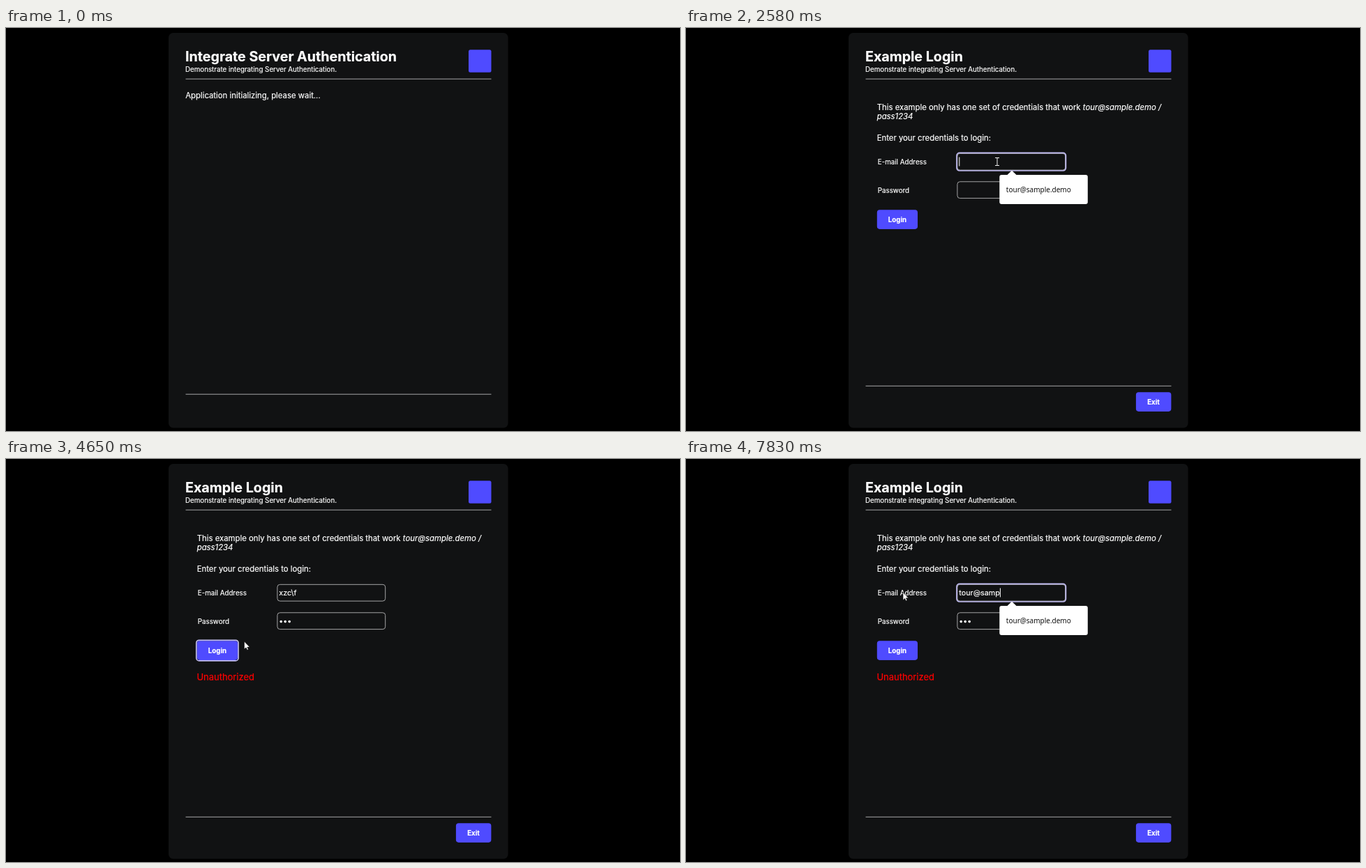
Write an HTML page that moves like this. It is 966 px wide and 579 px high and loops after 8 s.

```html
<!DOCTYPE html>
<html lang="en">
<head>
<meta charset="utf-8">
<title>Example Login</title>
<style>
  html, body { margin: 0; width: 100%; height: 100%; overflow: hidden; background: #000; }
  svg { display: block; }
  text { font: 11.35px Inter, sans-serif; color: #fff; fill: currentColor; stroke: currentColor; stroke-width: .2; white-space: pre; }
  .title { font-size: 19.66px; font-weight: 700; }
  .small { font-size: 9.77px; }
  .bold { font-size: 9.73px; font-weight: 700; }
  .italic { font-style: italic; }
  .typed { font-size: 10.8px; }
  .error { font-size: 12.98px; color: #f00; }
  .hint { font: 10px "Noto Sans", "Open Sans", sans-serif; color: #111; stroke: none; }
  .button { fill: #4f4bff; }
  .hover { fill: #1c17ff; }
  .field { fill: none; stroke: #a4a4a5; }
  .ring { fill: none; stroke: #c2bdf3; stroke-width: 1.7; }
  .rule { stroke: #a6a6a7; }
</style>
</head>
<body>
<svg width="966" height="579" viewBox="0 0 966 579">
  <rect x="233" y="7" width="486.6" height="567.5" rx="6.5" fill="#111213"/>
  <text id="title" class="title" x="257" y="48.2"></text>
  <text class="small" x="257" y="63.3">Demonstrate integrating Server Authentication.</text>
  <rect x="663" y="31.3" width="32.5" height="32.5" rx="2.5" fill="#4f4bff"/>
  <path class="rule" d="M257.5 73.2H695.5"/>
  <path id="footer" class="rule" d="M257.5 0H695.5"/>
  <text id="wait" x="257.2" y="101.3">Application initializing, please wait...</text>

  <g id="form">
    <text x="273.7" y="117.5">This example only has one set of credentials that work <tspan class="italic">tour@sample.demo /</tspan></text>
    <text class="italic" x="273.7" y="131.4">pass1234</text>
    <text x="273.7" y="161.5">Enter your credentials to login:</text>
    <text class="small" x="274.8" y="195.7">E-mail Address</text>
    <text class="small" x="274.8" y="236.5">Password</text>
    <rect class="field" x="388.9" y="180.3" width="154.8" height="23.8" rx="3.8"/>
    <rect class="field" x="388.9" y="220.8" width="154.8" height="23.8" rx="3.8"/>
    <rect id="login" class="button" x="273.8" y="261.3" width="58.2" height="27.6" rx="3.8"/>
    <text class="bold" x="303" y="278.7" text-anchor="middle">Login</text>
    <rect class="button" x="644.9" y="523.3" width="50.5" height="27.6" rx="3.8"/>
    <text class="bold" x="670" y="540.8" text-anchor="middle">Exit</text>
    <text id="error" class="error" x="273.4" y="317.8">Unauthorized</text>

    <rect id="ring" class="ring" rx="4"/>
    <rect id="selection" y="185.5" height="13.5" fill="#338fff"/>
    <text id="email" class="typed" x="391.3" y="196"></text>
    <g id="dots" fill="#fff">
      <circle cx="394.2" cy="233.6" r="1.8"/>
      <circle cx="400.2" cy="233.6" r="1.8"/>
      <circle cx="406.2" cy="233.6" r="1.8"/>
    </g>
    <rect id="caret" width="1" height="13" fill="#fff"/>

    <g id="popup">
      <path d="M460 211.5L467 204.8L474 211.5Z" fill="#fff"/>
      <rect x="449.3" y="211" width="126.5" height="42" rx="3" fill="#fff"/>
      <text class="hint" x="458.8" y="235.8">tour@sample.demo</text>
    </g>
  </g>

  <g id="pointer">
    <circle id="press" cx="-.7" r="9.7" fill="#ff0" opacity=".52"/>
    <path id="arrow" d="M0 0V11.2L2.6 8.9L4.3 12.4L6 11.6L4.4 8.3H8Z" fill="#fff" stroke="#000" stroke-width=".6"/>
    <path id="beam" d="M-3 -5.5H3M0 -5.5V5.5M-3 5.5H3" fill="none" stroke="#eee"/>
    <path id="hand" d="M-1.2 .5Q0 -1 1.2 .5V5Q2.5 4.2 3.4 5.2Q5 4.6 5.6 6Q7 5.6 7 7.2V10Q6.6 11.5 6 13.4H-.2Q-1.5 11 -3.4 8.6Q-3.6 6.8 -1.2 8Z" fill="#fff" stroke="#000" stroke-width=".6"/>
  </g>
</svg>
<script>
const LOOP = 8000;
const $ = id => document.getElementById(id);
const show = (id, on) => $(id).style.display = on ? '' : 'none';
const set = (id, attrs) => { for (const k in attrs) $(id).setAttribute(k, attrs[k]); };
const within = (t, a, b) => t >= a && t < b;

// Last value whose start time has passed
const latest = (steps, t) => steps.reduce((v, [at, next]) => t >= at ? next : v, steps[0][1]);

const path = [ // time, x, y
  [1820, 883, 433], [1900, 883, 433], [2480, 446, 192], [2780, 446, 192],
  [2980, 440, 225.5], [3040, 440, 225.5], [3120, 436, 231], [3380, 436, 231],
  [3580, 322, 270], [3650, 322, 270], [3850, 318.8, 272], [4580, 318.8, 272],
  [4860, 460, 210], [5000, 460, 210], [5350, 453.2, 191.3], [5490, 453.2, 191.3],
  [5700, 311, 191.5], [LOOP, 311, 191.5]
];
const presses = [[2500, 2580], [3140, 3220], [3980, 4050], [5400, 5830]];
const emailSteps = [
  [0, ''], [2780, 'x'], [2830, 'xz'], [2880, 'xzc'], [2930, 'xzc\\f'],
  ...[6360, 6430, 6700, 6760, 7310, 7430, 7650, 7740, 7830]
    .map((at, i) => [at, 'tour@samp'.slice(0, i + 1)])
];
const dotSteps = [[0, 0], [3240, 1], [3310, 2], [3380, 3]];
const focusSteps = [[0, ''], [2500, 'email'], [3140, 'password'], [3990, 'login'], [5400, 'email']];
const popupSteps = [[0, 0], [2580, 1], [2930, .55], [2980, .17], [3040, 0], [6360, 1]];
const rings = {
  email: { x: 388, y: 179.4, width: 156.4, height: 25.6 },
  password: { x: 388, y: 219.9, width: 156.4, height: 25.6 },
  login: { x: 272.8, y: 260.3, width: 60.2, height: 29.6 }
};

function pointerAt(t) {
  const i = Math.max(1, path.findIndex(p => p[0] > t));
  const [t0, x0, y0] = path[i - 1], [t1, x1, y1] = path[i];
  const u = Math.min(1, Math.max(0, (t - t0) / (t1 - t0)));
  const e = u * u * (3 - 2 * u);
  return [x0 + (x1 - x0) * e, y0 + (y1 - y0) * e];
}

function drawPointer(t, x, y) {
  const dragging = within(t, 5400, 5830);
  const overField = within(x, 388, 545) && (within(y, 180, 205) || within(y, 220, 246));
  const overLogin = within(x, 274, 332) && within(y, 261, 289);
  const kind = dragging || overField ? 'beam' : overLogin ? 'hand' : 'arrow';
  for (const k of ['beam', 'hand', 'arrow']) show(k, k === kind);
  show('pointer', t >= 1820);
  show('press', presses.some(([a, b]) => within(t, a, b)));
  set('pointer', { transform: `translate(${x} ${y})` });
  $('login').classList.toggle('hover', overLogin);
}

function drawForm(t, x) {
  const focus = latest(focusSteps, t);
  show('ring', focus);
  if (focus) set('ring', rings[focus]);

  $('email').textContent = latest(emailSteps, t);
  const end = 391.3 + $('email').getComputedTextLength();
  const dots = latest(dotSteps, t);
  [...$('dots').children].forEach((d, i) => d.style.display = i < dots ? '' : 'none');

  const start = Math.max(391.3, x);
  const selected = within(t, 5490, 6360) && start < end;
  show('selection', selected);
  if (selected) set('selection', { x: start, width: end - start });

  show('caret', !selected && (focus === 'email' || focus === 'password'));
  set('caret', focus === 'email' ? { x: end, y: 185.5 } : { x: 391 + 6 * dots, y: 226.5 });

  const alpha = latest(popupSteps, t), scale = .946 + .054 * alpha;
  set('popup', { opacity: alpha, transform: `translate(512.5 232) scale(${scale}) translate(-512.5 -232)` });
  show('error', t >= 4050);
}

function draw(t) {
  const ready = t >= 500;
  $('title').textContent = ready ? 'Example Login' : 'Integrate Server Authentication';
  show('wait', !ready);
  show('form', ready);
  set('footer', { transform: `translate(0 ${ready ? 514.3 : 526.2})` });
  const [x, y] = pointerAt(t);
  drawPointer(t, x, y);
  if (ready) drawForm(t, x);
}

const began = performance.now();
function tick() {
  draw((performance.now() - began) % LOOP);
  requestAnimationFrame(tick);
}
tick();
</script>
</body>
</html>
```
